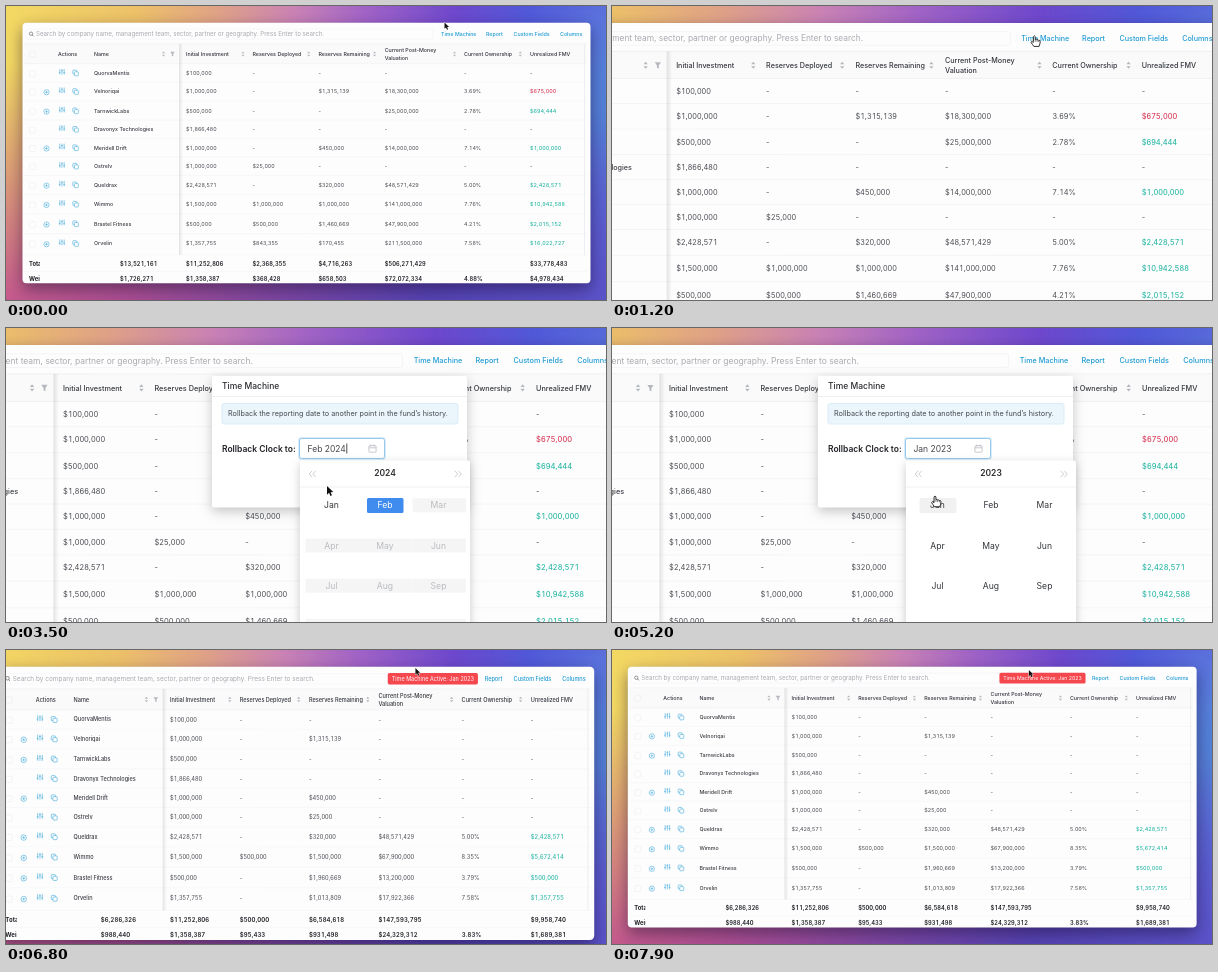
An HTML page with a canvas that plays this animation: 600x294 px, repeating every 8000 ms.

```html
<!DOCTYPE html>
<html lang="en">
<head>
<meta charset="utf-8">
<title>Fund table rollback</title>
<style>
html, body { margin: 0; width: 100%; height: 100%; overflow: hidden; background: #fff; }
canvas { display: block; width: 600px; height: 294px; }
</style>
</head>
<body>
<canvas id="stage"></canvas>
<script>
const W = 600, H = 294, LOOP = 8000;
const FONT = 'Inter, "Open Sans", sans-serif';
const canvas = document.getElementById('stage');
const ctx = canvas.getContext('2d');
const dpr = window.devicePixelRatio || 1;
canvas.width = W * dpr;
canvas.height = H * dpr;

const BLUE = '#1d9ad2', ICON = '#45acd9', TEAL = '#2fb9a6', RED = '#d8405c';
const ZOOM = 1.375, PAN_X = 190.5, PAN_Y = 6.1;
const T = { popup: 1500, picker: 2800, year: 4050, pick: 5120, pickerEnd: 5300, done: 5800, zoomOut: 5865 };

const COLS = [180, 246.5, 312.5, 378.7, 458, 524];
const ROW_Y = [67, 85.5, 104.8, 123.3, 141.7, 160.1, 178.8, 198.2, 217.7, 237.5];
const NAMES = ['QuorvaMentis', 'Velnoriqai', 'TarnwickLabs', 'Dravonyx Technologies', 'Meridell Drift',
  'Ostrelv', 'Queldrax', 'Wimmo', 'Brastel Fitness', 'Orvelin'];
const HEADS = ['Initial Investment', 'Reserves Deployed', 'Reserves Remaining', 'Current Post-Money|Valuation',
  'Current Ownership', 'Unrealized FMV'];
const parse = s => s.trim().split('\n').map(r => r.trim().split(' '));

const NOW = parse(`
  $100,000 - - - - -
  $1,000,000 - $1,315,139 $18,300,000 3.69% $675,000
  $500,000 - - $25,000,000 2.78% $694,444
  $1,866,480 - - - - -
  $1,000,000 - $450,000 $14,000,000 7.14% $1,000,000
  $1,000,000 $25,000 - - - -
  $2,428,571 - $320,000 $48,571,429 5.00% $2,428,571
  $1,500,000 $1,000,000 $1,000,000 $141,000,000 7.76% $10,942,588
  $500,000 $500,000 $1,460,669 $47,900,000 4.21% $2,015,152
  $1,357,755 $843,355 $170,455 $211,500,000 7.58% $16,022,727`);
const PAST = parse(`
  $100,000 - - - - -
  $1,000,000 - $1,315,139 - - -
  $500,000 - - - - -
  $1,866,480 - - - - -
  $1,000,000 - $450,000 - - -
  $1,000,000 - $25,000 - - -
  $2,428,571 - $320,000 $48,571,429 5.00% $2,428,571
  $1,500,000 $500,000 $1,500,000 $67,900,000 8.35% $5,672,414
  $500,000 - $1,960,669 $13,200,000 3.79% $500,000
  $1,357,755 - $1,013,809 $17,922,366 7.58% $1,357,755`);
const NOW_SUM = parse(`
  $13,521,161 $11,252,806 $2,368,355 $4,716,263 $506,271,429 _ $33,778,483
  $1,726,271 $1,358,387 $368,428 $658,503 $72,072,334 4.88% $4,978,434`);
const PAST_SUM = parse(`
  $6,286,326 $11,252,806 $500,000 $6,584,618 $147,593,795 _ $9,958,740
  $988,440 $1,358,387 $95,433 $931,498 $24,329,312 3.83% $1,689,381`);

const clamp = v => Math.max(0, Math.min(1, v));
const ramp = (t, a, b) => clamp((t - a) / (b - a));
const ease = v => v * v * (3 - 2 * v);
const spring = ms => ms <= 0 ? 0 : 1 - (1 + ms * 0.0038) * Math.exp(-ms * 0.0038);
const doc = (x, y) => [(x + PAN_X) / ZOOM, (y + PAN_Y) / ZOOM];

// time, x, y in table coordinates
const PATH = [
  [0, 438.5, 16.5], [250, 438.5, 16.5], [950, 444.7, 26], [1400, 444.7, 26.5], [1900, 444.7, 30.6],
  [2200, 444.7, 30.6], [2700, ...doc(338, 122)], [2950, ...doc(338, 122)], [3500, ...doc(321, 158)],
  [3850, ...doc(306, 146)], [4150, ...doc(306, 146)], [4700, ...doc(323, 168)], [5450, ...doc(323, 168)],
  [6300, 414, 18], [6800, 414, 18], [7700, 417, 20], [8000, 417, 20]
];

function cursorAt(t) {
  let i = 1;
  while (i < PATH.length - 1 && t > PATH[i][0]) i++;
  const [t0, x0, y0] = PATH[i - 1], [t1, x1, y1] = PATH[i];
  const k = ease(ramp(t, t0, t1));
  return [x0 + (x1 - x0) * k, y0 + (y1 - y0) * k];
}

function text(s, x, y, size, color, weight = 400, align = 'left') {
  ctx.font = `${weight} ${size}px ${FONT}`;
  ctx.fillStyle = color;
  ctx.textAlign = align;
  ctx.fillText(s, x, y + size * 0.36);
}

// Tabular figures: every digit takes the width of a zero.
function figures(s, x, y, size, color, weight = 400) {
  ctx.font = `${weight} ${size}px ${FONT}`;
  const zero = ctx.measureText('0').width;
  for (const ch of s) {
    const own = ctx.measureText(ch).width;
    const w = /\d/.test(ch) ? zero : own;
    text(ch, x + (w - own) / 2, y, size, color, weight);
    x += w;
  }
}

function box(x, y, w, h, r, fill, stroke, lw = 0.6) {
  ctx.beginPath();
  ctx.roundRect(x, y, w, h, r);
  if (fill) { ctx.fillStyle = fill; ctx.fill(); }
  if (stroke) { ctx.strokeStyle = stroke; ctx.lineWidth = lw; ctx.stroke(); }
}

function line(color, lw, ...pts) {
  ctx.beginPath();
  for (let i = 0; i < pts.length; i += 4) {
    ctx.moveTo(pts[i], pts[i + 1]);
    ctx.lineTo(pts[i + 2], pts[i + 3]);
  }
  ctx.strokeStyle = color;
  ctx.lineWidth = lw;
  ctx.stroke();
}

function shadowed(color, blur, dy, draw) {
  ctx.save();
  ctx.shadowColor = color;
  ctx.shadowBlur = blur * dpr;
  ctx.shadowOffsetY = dy * dpr;
  draw();
  ctx.restore();
}

function fade(alpha, draw) {
  if (alpha <= 0) return;
  ctx.save();
  ctx.globalAlpha = alpha;
  draw();
  ctx.restore();
}

function layer(paint) {
  const c = document.createElement('canvas');
  c.width = W;
  c.height = H;
  paint(c.getContext('2d'));
  return c;
}

function wash(g, grad, stops) {
  stops.forEach(([p, c]) => grad.addColorStop(p, c));
  g.fillStyle = grad;
  g.fillRect(0, 0, W, H);
}

const lower = layer(g => {
  wash(g, g.createLinearGradient(0, 0, W, 0),
    [[0, '#c4588c'], [0.2, '#ab4c94'], [0.45, '#7c45a2'], [0.7, '#5443b2'], [1, '#5a52c8']]);
  g.globalCompositeOperation = 'destination-in';
  wash(g, g.createLinearGradient(0, H * 0.2, 0, H), [[0, 'rgba(0,0,0,0)'], [1, '#000']]);
});
const backdrop = layer(g => {
  wash(g, g.createLinearGradient(0, 0, W, 0),
    [[0, '#f3d962'], [0.22, '#ecc068'], [0.36, '#dfa088'], [0.48, '#c982b4'], [0.6, '#a062c6'],
      [0.75, '#6d47cd'], [0.87, '#5058d8'], [1, '#5b70dc']]);
  wash(g, g.createRadialGradient(W, 110, 0, W, 110, 110),
    [[0, 'rgba(78,148,218,0.8)'], [1, 'rgba(78,148,218,0)']]);
  g.drawImage(lower, 0, 0);
});

function sortIcon(x, y) {
  ctx.fillStyle = '#b4b8bd';
  ctx.beginPath();
  for (const d of [-1, 1]) {
    ctx.moveTo(x - 1.6, y + d * 0.7);
    ctx.lineTo(x + 1.6, y + d * 0.7);
    ctx.lineTo(x, y + d * 2.6);
    ctx.closePath();
  }
  ctx.fill();
}

function filterIcon(x, y) {
  ctx.fillStyle = '#b4b8bd';
  ctx.beginPath();
  [[-2.3, -2.2], [2.3, -2.2], [0.7, 0], [0.7, 2.4], [-0.7, 1.8], [-0.7, 0]]
    .forEach(([a, b]) => ctx.lineTo(x + a, y + b));
  ctx.fill();
}

function rowIcons(y, plus) {
  box(23.5, y - 2.2, 6, 6, 1, null, '#e8eaec', 0.5);
  if (plus) {
    ctx.beginPath();
    ctx.arc(40.5, y + 0.8, 2.6, 0, 7);
    ctx.strokeStyle = ICON;
    ctx.lineWidth = 0.6;
    ctx.stroke();
    line(ICON, 0.6, 39.2, y + 0.8, 41.8, y + 0.8, 40.5, y - 0.5, 40.5, y + 2.1);
  }
  const top = y - 1.2;
  [[53.8, 0.8], [56, -1], [58.2, 0.8]].forEach(([x, d]) =>
    line(ICON, 0.6, x, top - 2.8, x, top + 2.8, x - 0.9, top + d, x + 0.9, top + d));
  box(66.8, y - 2.8, 4, 4, 0.8, null, ICON, 0.6);
  box(68.4, y - 1.2, 4, 4, 0.8, '#fdfdfe', ICON, 0.6);
}

function toolbar(past) {
  box(20, 23.2, 407, 10, 1.5, null, '#f0f1f3', 0.5);
  ctx.beginPath();
  ctx.arc(25, 27.7, 1.7, 0, 7);
  ctx.strokeStyle = '#555';
  ctx.lineWidth = 0.6;
  ctx.stroke();
  line('#555', 0.7, 26.2, 28.9, 27.6, 30.3);
  text('Search by company name, management team, sector, partner or geography. Press Enter to search.',
    30, 28.2, 6.18, '#a8aaae');
  if (past) {
    box(387.6, 22.8, 86, 10.8, 1.6, '#f5474e');
    text('Time Machine Active: Jan 2023', 430.6, 28.2, 5.25, '#fff', 400, 'center');
  } else {
    text('Time Machine', 435, 28.2, 5.25, BLUE, 500);
  }
  text('Report', 480, 28.2, 5.3, BLUE, 500);
  text('Custom Fields', 507.6, 28.2, 5.3, BLUE, 500);
  text('Columns', 554, 28.2, 5.3, BLUE, 500);
}

function table(past) {
  const rows = past ? PAST : NOW, sums = past ? PAST_SUM : NOW_SUM;
  ctx.fillStyle = '#fafafb';
  ctx.fillRect(18, 37.8, 563, 20);
  line('#ececee', 0.5, 18, 37.8, 581, 37.8, 18, 57.8, 581, 57.8);
  box(23.5, 45.2, 6, 6, 1, null, '#e8eaec', 0.5);
  text('Actions', 52, 48.1, 5.3, '#33363b', 500);
  text('Name', 88, 48.1, 5.3, '#33363b', 500);
  [157.5, 237, 302.7, 368.6, 448.5, 514.3].forEach(x => sortIcon(x, 48));
  filterIcon(166.5, 48);
  HEADS.forEach((h, c) => {
    const parts = h.split('|');
    parts.forEach((s, i) => text(s, COLS[c], parts.length > 1 ? 44.2 + i * 7.6 : 48.1, 5.3, '#33363b', 500));
  });

  rows.forEach((row, r) => {
    const y = ROW_Y[r];
    rowIcons(y, ![0, 3, 5].includes(r));
    text(NAMES[r], 88, y, 5.3, '#3b3e43', 500);
    row.forEach((s, c) => {
      const fmv = c === 5 && s !== '-';
      figures(s, COLS[c], y, 5.45, fmv ? (s === '$675,000' ? RED : TEAL) : '#4a4d52', fmv ? 500 : 400);
    });
    const ly = r < 9 ? (y + ROW_Y[r + 1]) / 2 : 249;
    line('#f0f1f2', 0.5, 18, ly, 581, ly);
  });

  const g = ctx.createLinearGradient(173, 0, 177, 0);
  g.addColorStop(0, 'rgba(0,0,0,0.1)');
  g.addColorStop(1, 'rgba(0,0,0,0)');
  ctx.fillStyle = g;
  ctx.fillRect(173, 37.8, 4, 211.2);
  line('#e9eaec', 0.8, 578.5, 37.8, 578.5, 249);

  line('#f2f2f4', 0.5, 18, 265.5, 581, 265.5);
  ctx.save();
  ctx.beginPath();
  ctx.rect(18, 250, 16, 27);
  ctx.clip();
  text('Total', 23, 258, 5.8, '#1d1f23', 700);
  text('Weighted', 23, 272.8, 5.8, '#1d1f23', 700);
  ctx.restore();
  sums.forEach((row, r) => row.forEach((s, c) => {
    if (s !== '_') figures(s, c ? COLS[c - 1] : 114, 258 + r * 14.8, 5.7, '#1d1f23', 600);
  }));
}

function calendarIcon(x, y) {
  box(x - 3.6, y - 3, 7.2, 6.6, 0.8, null, '#b9bcc1', 0.8);
  line('#b9bcc1', 0.8, x - 3.6, y - 0.8, x + 3.6, y - 0.8, x - 1.7, y - 4, x - 1.7, y - 2, x + 1.7, y - 4, x + 1.7, y - 2);
}

function popup(t) {
  shadowed('rgba(0,0,0,0.22)', 12, 4, () => box(206, 48, 255, 131.5, 2, '#fff'));
  text('Time Machine', 216, 58, 8.5, '#2b2d31', 500);
  line('#ececee', 0.8, 206, 68.5, 461, 68.5);
  box(216, 75.5, 236, 20.5, 2, '#eaf6fc', '#d3e9f5', 0.8);
  text('Rollback the reporting date to another point in the fund\u2019s history.', 222, 85.8, 7.25, '#45494f');
  text('Rollback Clock to:', 216, 120.5, 8.5, '#222428', 600);
  const focus = t >= T.picker && t < T.pickerEnd + 150;
  if (focus) box(293.5, 110.5, 85, 20, 2, null, 'rgba(70,160,230,0.2)', 3);
  box(293.5, 110.5, 85, 20, 2, '#fff', focus ? '#8cc4ea' : '#eeeff1', 0.9);
  text(t < T.pick ? 'Feb 2024' : 'Jan 2023', 301.5, 120.6, 8.5, '#45484d');
  if (focus && t < T.year) line('#222', 0.8, 340.8, 115.5, 340.8, 125.5);
  calendarIcon(366.5, 120.6);
  shadowed('rgba(0,0,0,0.08)', 3, 1, () => box(373.5, 152.5, 76, 18.5, 2, '#fff', '#f0f0f1', 0.6));
  text('Reset to today', 411.5, 162, 8.5, '#3a3c40', 400, 'center');
}

function chevrons(x, dir) {
  for (const o of [-1.8, 1.8]) {
    line('#bfc1c5', 0.8, x + o + dir * 1.5, 146, x + o - dir * 1.5, 142.8, x + o + dir * 1.5, 146, x + o - dir * 1.5, 149.2);
  }
}

function picker(t) {
  const past = t >= T.year;
  shadowed('rgba(0,0,0,0.2)', 10, 3, () => box(294, 132.5, 170, 190, 2, '#fff'));
  chevrons(306.5, -1);
  chevrons(452, 1);
  text(past ? '2023' : '2024', 379, 145.3, 8.5, '#2b2d31', 600, 'center');
  line('#eeeff0', 0.8, 294, 159, 464, 159);
  ['Jan', 'Feb', 'Mar', 'Apr', 'May', 'Jun', 'Jul', 'Aug', 'Sep', 'Oct', 'Nov', 'Dec'].forEach((m, i) => {
    const x = 325.5 + (i % 3) * 53.5, y = 177.3 + Math.floor(i / 3) * 40.2;
    const off = !past && i > 1;
    let color = off ? '#b9bbbf' : '#33363a';
    if (off) {
      ctx.fillStyle = '#f5f5f5';
      ctx.fillRect(x - 26, y - 7, 53.5, 14);
    }
    if (!past && i === 1) {
      box(x - 18, y - 7.3, 36.5, 15, 1.5, '#3f8bee');
      color = '#fff';
    }
    if (past && i === 0 && t > 4450) box(x - 18, y - 7.3, 37, 15, 1.5, '#f1f1f2');
    text(m, x, y, 8.6, color, 400, 'center');
  });
}

function arrow(x, y) {
  ctx.save();
  ctx.translate(x, y);
  ctx.scale(0.6, 0.6);
  ctx.beginPath();
  [[0, 0], [0, 10.5], [2.5, 8.3], [4.2, 12], [6, 11.2], [4.4, 7.6], [7.6, 7.4]].forEach(p => ctx.lineTo(...p));
  ctx.closePath();
  ctx.lineJoin = 'round';
  ctx.strokeStyle = '#fff';
  ctx.lineWidth = 1.4;
  ctx.stroke();
  ctx.fillStyle = '#111';
  ctx.fill();
  ctx.restore();
}

function hand(x, y) {
  ctx.save();
  ctx.translate(x, y);
  ctx.scale(0.62, 0.62);
  ctx.beginPath();
  ctx.moveTo(-1.1, 7);
  ctx.lineTo(-1.1, 1);
  ctx.quadraticCurveTo(0, -1, 1.1, 1);
  ctx.lineTo(1.1, 4.4);
  ctx.quadraticCurveTo(2.4, 3.4, 3.2, 4.8);
  ctx.quadraticCurveTo(4.6, 4, 5.2, 5.4);
  ctx.quadraticCurveTo(6.8, 4.8, 7, 6.6);
  ctx.quadraticCurveTo(7, 9.6, 5.6, 12.6);
  ctx.lineTo(-0.6, 12.6);
  ctx.quadraticCurveTo(-2.4, 10.2, -4, 7.6);
  ctx.quadraticCurveTo(-3.4, 5.6, -1.1, 7.8);
  ctx.closePath();
  ctx.lineJoin = 'round';
  ctx.fillStyle = '#fff';
  ctx.fill();
  ctx.strokeStyle = '#222';
  ctx.lineWidth = 1.1;
  ctx.stroke();
  line('#222', 0.7, 1.1, 4.4, 1.1, 7, 3.2, 4.8, 3.2, 7.2, 5.2, 5.4, 5.2, 7.4);
  ctx.restore();
}

function draw(t) {
  const p = spring(t) * (1 - spring(t - T.zoomOut));
  const past = t >= T.done;
  ctx.setTransform(dpr, 0, 0, dpr, 0, 0);
  ctx.translate(-PAN_X * p, -PAN_Y * p);
  ctx.scale(1 + (ZOOM - 1) * p, 1 + (ZOOM - 1) * p);
  ctx.drawImage(backdrop, 0, 0);
  shadowed('rgba(25,10,50,0.5)', 16, 6, () => box(16.5, 16.8, 568, 260.4, 4, '#fdfdfe'));
  toolbar(past);
  table(past);

  ctx.save();
  ctx.scale(1 / ZOOM, 1 / ZOOM);
  ctx.translate(PAN_X, PAN_Y);
  fade(ramp(t, T.popup, T.popup + 150) * (1 - ramp(t, T.done - 80, T.done + 60)), () => popup(t));
  fade(ramp(t, T.picker, T.picker + 150) * (1 - ramp(t, T.pickerEnd, T.pickerEnd + 150)), () => picker(t));
  ctx.restore();

  const [x, y] = cursorAt(t);
  const pointing = (t > 850 && t < 1750) || (t > 3720 && t < 5600);
  (pointing ? hand : arrow)(x, y);
}

const start = performance.now();
function frame(now) {
  draw(Math.max(0, now - start) % LOOP);
  requestAnimationFrame(frame);
}
draw(0);
requestAnimationFrame(frame);
</script>
</body>
</html>
```
